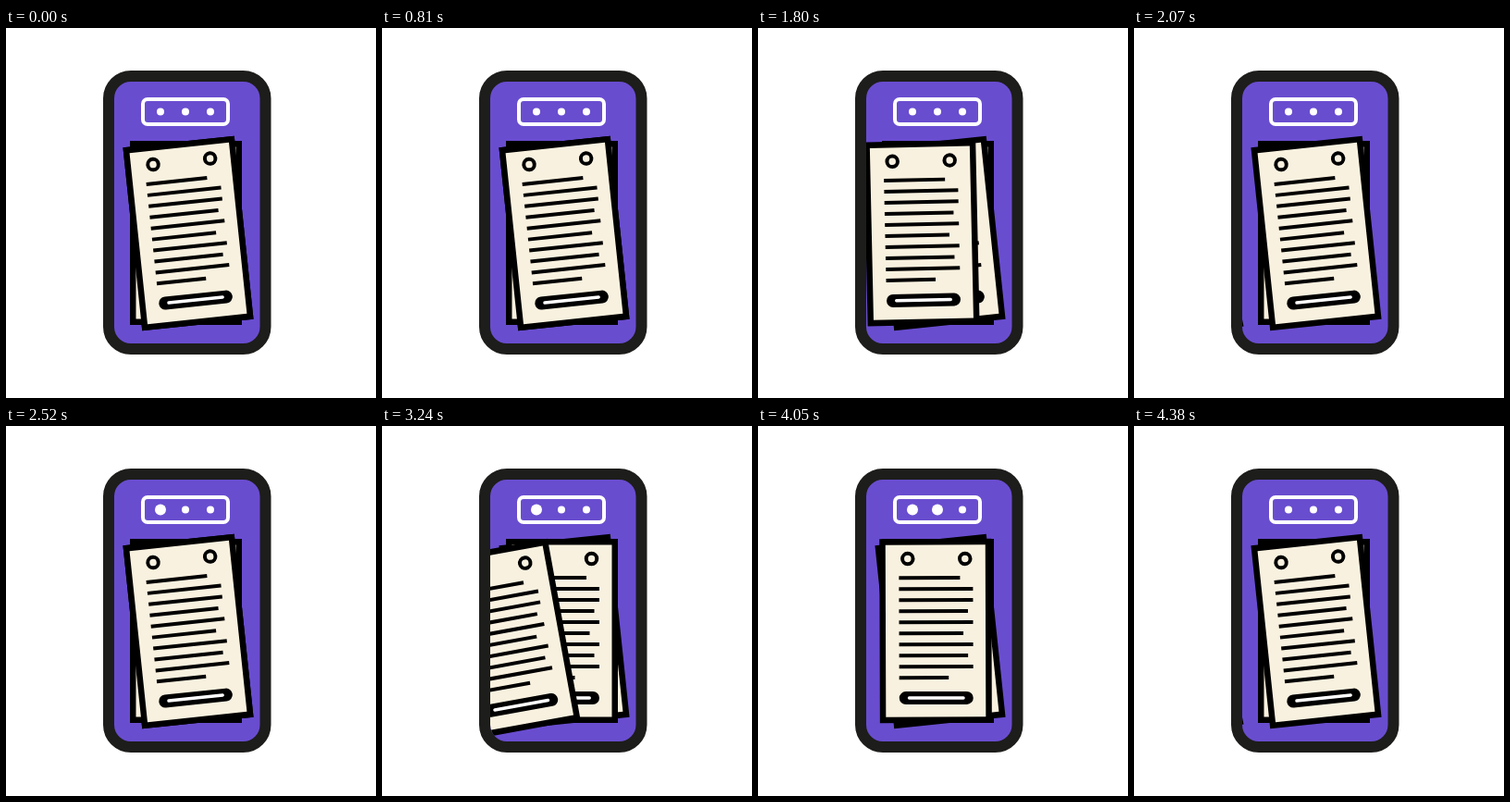
Recreate the animation shown at these times as an HTML page with a canvas. Size 400 px wide and 400 px high, loop 4.41 s.

```html
<!DOCTYPE html>
<html lang="en">
<head>
<meta charset="utf-8">
<title>Phone with sheets</title>
<style>
  html, body { margin: 0; width: 100%; height: 100%; overflow: hidden; background: #fff; }
  canvas { display: block; width: 100vmin; height: 100vmin; }
</style>
</head>
<body>
<canvas width="400" height="400"></canvas>
<script>
const ctx = document.querySelector('canvas').getContext('2d');
const LOOP = 4410;
const PURPLE = '#694dcf', FRAME = '#1d1d1b', CREAM = '#f9f1df', BLACK = '#000', WHITE = '#fff';
const LINE_LENGTHS = [66, 80, 80, 74.5, 80, 69.5, 80, 74.5, 80, 53.5];

const STRAIGHT = { x: 194.5, y: 221.5, angle: 0 };
const TILTED = { x: 197, y: 222, angle: -6 };

// Sheets swing out to the left around a pivot far below them.
const SWING = { pivot: 800, angle: 12.4, duration: 460, gone: 425 };

const clamp = v => Math.min(1, Math.max(0, v));
const ease = v => (1 - Math.cos(Math.PI * clamp(v))) / 2;
const mix = (a, b, v) => a + (b - a) * v;
const radians = degrees => degrees * Math.PI / 180;

function roundRect(x, y, w, h, r) {
  ctx.beginPath();
  ctx.roundRect(x, y, w, h, r);
}

function circle(x, y, r) {
  ctx.beginPath();
  ctx.arc(x, y, r, 0, 2 * Math.PI);
}

function paint(fill, stroke, width) {
  if (fill) {
    ctx.fillStyle = fill;
    ctx.fill();
  }
  if (stroke) {
    ctx.strokeStyle = stroke;
    ctx.lineWidth = width;
    ctx.stroke();
  }
}

function drawSheet(pose, swing = 0, scale = 1) {
  ctx.save();
  ctx.translate(pose.x, pose.y);
  ctx.rotate(radians(pose.angle));
  ctx.translate(0, SWING.pivot);
  ctx.rotate(radians(-swing));
  ctx.translate(0, -SWING.pivot);
  ctx.scale(scale, scale);

  ctx.beginPath();
  ctx.rect(-57.25, -96.25, 114.5, 192.5);
  paint(CREAM, BLACK, 6.5);

  for (const x of [-30, 32]) {
    circle(x, -78, 5.75);
    paint(CREAM, BLACK, 4);
  }

  ctx.fillStyle = BLACK;
  LINE_LENGTHS.forEach((length, i) => ctx.fillRect(-39.5, -59.5 + 12 * i, length, 4));

  roundRect(-39.5, 65.5, 80, 14, 7);
  paint(BLACK);
  roundRect(-30.5, 70.75, 62, 3.5, 1.75);
  paint(WHITE);
  ctx.restore();
}

function drawLeaving(pose, elapsed, scale) {
  if (elapsed >= SWING.gone) return;
  drawSheet(pose, SWING.angle * ease(elapsed / SWING.duration), scale);
}

function pulse(t) {
  return 1 + 0.04 * Math.sin(Math.PI * clamp((t - 2310) / 210));
}

function drawStack(t) {
  const second = t >= 2310;
  ctx.save();
  if (second || t >= 1500) {
    roundRect(117, 58, 157.5, 283, 18);
  } else {
    ctx.beginPath();
    ctx.rect(104, 58, 170.5, 283);
  }
  ctx.clip();
  drawSheet(STRAIGHT);
  drawSheet(TILTED);
  drawLeaving(STRAIGHT, t - (second ? 4015 : 1705));
  drawLeaving(TILTED, t - (second ? 3055 : 1075), pulse(t));
  ctx.restore();
}

function dotRadius(t, start) {
  const grow = (t - start) / 210;
  if (t >= 4170) return mix(6, 4, ease((t - 4170) / 210));
  return grow < 0.5 ? mix(4, 7.6, ease(grow / 0.5)) : mix(7.6, 6, ease((grow - 0.5) / 0.5));
}

function drawPanel(t) {
  roundRect(148, 77, 92, 27, 5);
  paint(null, WHITE, 4);
  [2310, 3480, Infinity].forEach((start, i) => {
    circle(167 + 27 * i, 90.5, t < start ? 4 : dotRadius(t, start));
    paint(WHITE);
  });
}

function render(now) {
  const t = now % LOOP;
  ctx.fillStyle = WHITE;
  ctx.fillRect(0, 0, 400, 400);
  roundRect(111, 52, 169.5, 295, 24);
  paint(PURPLE);
  drawPanel(t);
  drawStack(t);
  roundRect(111, 52, 169.5, 295, 24);
  paint(null, FRAME, 12);
}

let startTime;
function tick(now) {
  startTime ??= now;
  render(now - startTime);
  requestAnimationFrame(tick);
}
requestAnimationFrame(tick);
</script>
</body>
</html>
```
